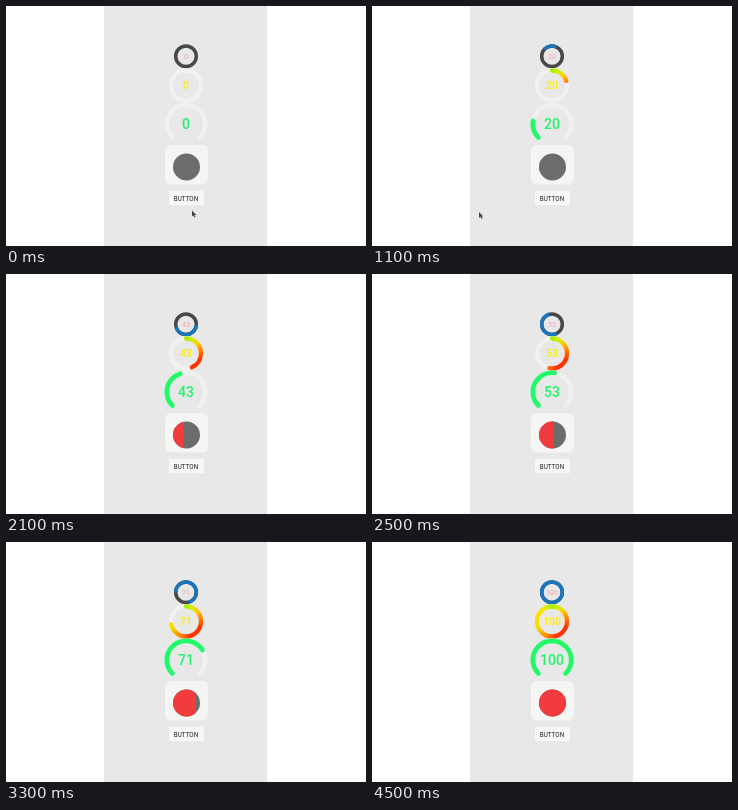
An HTML page with a canvas for the animation above (4.6 s loop, 360 by 240 pixels).

```html
<!DOCTYPE html>
<html lang="en">
<head>
<meta charset="utf-8">
<title>Progress views</title>
<style>
html, body { margin: 0; width: 100%; height: 100%; overflow: hidden; background: #fff; }
canvas { display: block; }
</style>
</head>
<body>
<canvas id="stage" width="360" height="240"></canvas>
<script>
const LOOP = 4600, STEP = 100, CX = 180;
const ctx = document.getElementById('stage').getContext('2d');
const rad = deg => deg * Math.PI / 180;
const clamp = (x, lo, hi) => Math.min(hi, Math.max(lo, x));
const mix = (a, b, k) => a + (b - a) * clamp(k, 0, 1);

// Angles run clockwise from twelve o'clock.
function arc(y, r, width, color, start, sweep, cap = 'butt') {
  if (sweep <= 0) return;
  ctx.beginPath();
  ctx.arc(CX, y, r, rad(start - 90), rad(start + sweep - 90));
  ctx.lineWidth = width;
  ctx.lineCap = cap;
  ctx.strokeStyle = color;
  ctx.stroke();
}

function label(text, y, size, color, weight = 400) {
  ctx.font = `${weight} ${size}px Roboto, sans-serif`;
  ctx.textAlign = 'center';
  ctx.fillStyle = color;
  ctx.fillText(text, CX, y);
}

function box(x, y, w, h, r, color) {
  ctx.beginPath();
  ctx.roundRect(x, y, w, h, r);
  ctx.fillStyle = color;
  ctx.fill();
}

const rainbow = ctx.createConicGradient(rad(-90), CX, 79.5);
[[0, '#9cf000'], [25, '#d8ee00'], [50, '#ffc800'], [80, '#ff7a00'], [115, '#ff3000'],
 [165, '#ff3400'], [205, '#ff8a00'], [245, '#f4dc00'], [300, '#ffe000'], [340, '#e0f000'], [360, '#9cf000']]
  .forEach(([deg, color]) => rainbow.addColorStop(deg / 360, color));

function icon(value) {
  box(159, 139, 43, 39.5, 6, '#f5f5f4');
  const disc = color => {
    ctx.beginPath();
    ctx.arc(180.5, 161, 13.5, 0, 7);
    ctx.fillStyle = color;
    ctx.fill();
  };
  disc('#6c6c6c');
  ctx.save();
  ctx.beginPath();
  ctx.rect(159, 139, 43 * value / 100, 40);
  ctx.clip();
  disc('#f23b3d');
  ctx.restore();
}

function pointer(t) {
  if (t >= 1600) return;
  const x = mix(186, 107, (t - 600) / 500);
  const y = mix(204.5, 206, (t - 600) / 500) + mix(0, 24, (t - 1200) / 300);
  ctx.save();
  ctx.translate(x, y);
  ctx.fillStyle = '#444';
  ctx.fill(new Path2D('M0 0V6L1.4 4.8L2.5 7.1L3.5 6.6L2.5 4.4H4.3Z'));
  ctx.restore();
}

function draw(t) {
  const value = clamp((t - 248) * 0.02354, 0, 100);
  const count = Math.floor(value);

  ctx.fillStyle = '#fff';
  ctx.fillRect(0, 0, 360, 240);
  ctx.fillStyle = '#e8e8e8';
  ctx.fillRect(98, 0, 163, 240);

  arc(50.2, 10.3, 3.5, '#484848', 0, 360);
  arc(50.2, 10.3, 3.5, '#1976bd', 6.1 * value - 170, 3.6 * value);
  label(count, 52.8, 7, '#f5a3ab');

  arc(79.5, 15, 4.3, '#f1f1f1', 0, 360);
  arc(79.5, 15, 4.3, rainbow, 0, 3.6 * value, 'round');
  label(count, 83.3, 10.4, '#ffee00', 500);

  arc(118, 19.2, 4.7, '#f0f0f0', 225, 270, 'round');
  arc(118, 19.2, 4.7, '#20fa69', 225, 2.7 * value, 'round');
  label(count, 123, 14, '#24f26a', 500);

  icon(value);

  box(163, 185.3, 35, 15, 1, '#dfdfdf');
  box(163, 184.8, 35, 14.8, 1, '#f7f7f6');
  label('BUTTON', 194.6, 6.3, '#222');

  pointer(t);
}

function frame(now) {
  draw(Math.floor(now % LOOP / STEP) * STEP);
  requestAnimationFrame(frame);
}
requestAnimationFrame(frame);
</script>
</body>
</html>
```
